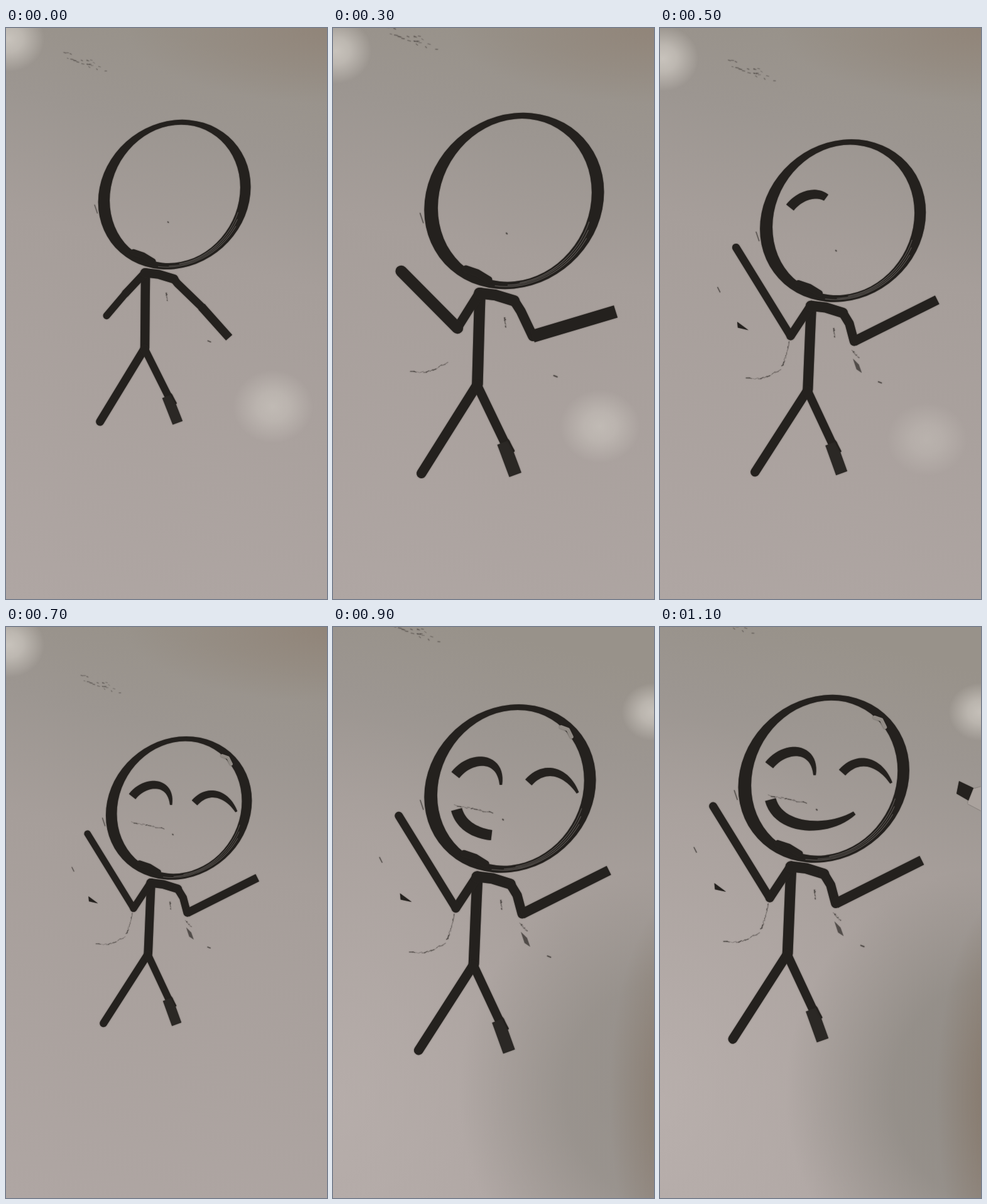
Write an HTML page with a canvas that moves like this. It is 511 by 908 pixels and loops after 1300 ms.

```html
<!DOCTYPE html>
<html lang="en">
<head>
<meta charset="utf-8">
<title>Whiteboard figure</title>
<style>
html, body { margin: 0; width: 100%; height: 100%; overflow: hidden; background: #a49d99; }
canvas { display: block; width: 100vw; height: 100vh; }
</style>
</head>
<body>
<canvas id="stage" width="511" height="908"></canvas>
<script>
const W = 511, H = 908, STEP = 100, LOOP = 1300, LAST = 11;
const ctx = document.getElementById('stage').getContext('2d');
const INK = '#24211e', SMUDGE = 'rgba(50,46,43,.6)', FAINT = 'rgba(60,55,52,.35)';

// hand-held camera: step, neck x, neck y, body scale, head scale, lean
const CAMERA = [
  [0, 222, 384, .847, .87, .028],
  [2, 222, 378, 1.03, 1.048, .028],
  [4, 246, 453, 1.018, 1.003, 0],
  [7, 231, 402, .798, .833, 0],
  [8, 234, 411, .973, .958, 0],
  [10, 226, 371, 1, 1, 0],
  [11, 209, 375, .98, .976, 0]
];

// elbow and hand for arms down, out and up, measured from the neck
const LEFT = [[-39, 45, -76, 87], [-37, 63, -117, 36], [-35, 57, -127, -92]];
const RIGHT = [[103, 70, 153, 128], [90, 80, 209, 73], [72, 66, 212, -4]];

const clamp = (v, lo, hi) => Math.max(lo, Math.min(hi, v));
const mix = (a, b, k) => a.map((v, i) => v + (b[i] - v) * k);

function cameraAt(n) {
  let i = 0;
  while (i < CAMERA.length - 2 && CAMERA[i + 1][0] <= n) i++;
  const a = CAMERA[i], b = CAMERA[i + 1];
  return mix(a, b, (n - a[0]) / (b[0] - a[0]));
}

function armAt(keys, lift) {
  const i = lift < 1 ? 0 : 1;
  return mix(keys[i], keys[i + 1], lift - i);
}

function seeded(s) {
  return () => (s = (s * 16807) % 2147483647) / 2147483647;
}

function line(p, width, color = INK, cap = 'round') {
  ctx.strokeStyle = color;
  ctx.lineWidth = width;
  ctx.lineCap = cap;
  ctx.lineJoin = 'round';
  ctx.beginPath();
  for (let i = 0; i < p.length; i += 2) ctx.lineTo(p[i], p[i + 1]);
  ctx.stroke();
}

function shape(p, color = INK) {
  ctx.fillStyle = color;
  ctx.beginPath();
  for (let i = 0; i < p.length; i += 2) ctx.lineTo(p[i], p[i + 1]);
  ctx.fill();
}

// tapering marker stroke along a cubic curve, drawn up to the share k
function brush(p, from, to, k) {
  if (k <= 0) return;
  const edge = [[], []], steps = 24;
  for (let i = 0; i <= steps; i++) {
    const t = i / steps * k, u = 1 - t;
    const pos = o => u * u * u * p[o] + 3 * u * u * t * p[o + 2] + 3 * u * t * t * p[o + 4] + t * t * t * p[o + 6];
    const dir = o => u * u * (p[o + 2] - p[o]) + 2 * u * t * (p[o + 4] - p[o + 2]) + t * t * (p[o + 6] - p[o + 4]);
    const dx = dir(0), dy = dir(1), r = (from + (to - from) * t ** 3) / 2 / Math.hypot(dx, dy);
    edge[0].push(pos(0) - dy * r, pos(1) + dx * r);
    edge[1].unshift(pos(0) + dy * r, pos(1) - dx * r);
  }
  shape(edge.flat());
}

// thin broken trail left by the eraser
function scratch(seed, x, y, dx, dy, bend) {
  const rnd = seeded(seed), steps = 12;
  for (let i = 0; i < steps; i++) {
    const at = k => [x + dx * k + rnd() * 2, y + dy * k + bend * Math.sin(k * Math.PI) + rnd() * 3];
    line([...at(i / steps), ...at((i + .9) / steps)], .6 + rnd(), rnd() < .5 ? FAINT : SMUDGE);
  }
}

function specks(seed, count, x, y, w, h) {
  const rnd = seeded(seed);
  for (let i = 0; i < count; i++) {
    const k = rnd(), px = x + k * w, py = y + k * h + rnd() * 16 - 8;
    line([px, py, px + 1 + rnd() * 4, py + rnd() * 2], .8 + rnd(), FAINT);
  }
}

function fade(x, y, rx, ry, rgb, stops) {
  ctx.save();
  ctx.translate(x, y);
  ctx.scale(rx, ry);
  const g = ctx.createRadialGradient(0, 0, 0, 0, 0, 1);
  stops.forEach(([k, a]) => g.addColorStop(k, `rgba(${rgb},${a})`));
  ctx.fillStyle = g;
  ctx.fillRect(-1, -1, 2, 2);
  ctx.restore();
}

const glow = (x, y, r, a) =>
  fade(x, y, r * 1.1, r, '208,203,196', [[0, a], [.4, a * .75], [1, 0]]);

function board(n, neckY) {
  const g = ctx.createLinearGradient(230, 0, 0, H);
  g.addColorStop(0, '#98928a');
  g.addColorStop(.16, '#9c9691');
  g.addColorStop(.36, '#a69e9a');
  g.addColorStop(1, '#afa6a3');
  ctx.fillStyle = g;
  ctx.fillRect(0, 0, W, H);
  if (n < 8) {
    fade(520, 0, 330, 120, '142,128,115', [[0, .75], [1, 0]]);
    glow(4, (neckY - 355) * .6, 52, .85);
    glow(425, neckY + 218, 58, .6 * clamp((7 - n) / 3, 0, 1));
  } else {
    const shade = .75 + (n - 8) * .08;
    fade(0, 760, 420, 620, '188,179,176', [[0, shade * .7], [1, 0]]);
    fade(540, 740, 340, 360, '145,140,134', [[0, shade], [.5, shade * .85], [1, 0]]);
    fade(560, 750, 120, 330, '132,117,103', [[0, shade], [.4, shade * .7], [1, 0]]);
    glow(510, 135, 46, .8);
  }
}

function marks(lift) {
  specks(71, 22, -140, -405, 78, 28);
  scratch(5, 37, 42, 1, 16, 0);
  line([113, 134, 118, 136], 2, SMUDGE);
  if (lift >= 1) scratch(9, -110, 127, 58, -16, 6);
  if (lift < 2) return;
  scratch(13, -50, 105, 12, -42, 4);
  scratch(17, 68, 80, 12, 13, 0);
  shape([-125, 33, -106, 47, -124, 43]);
  shape([70, 95, 80, 105, 85, 119, 76, 113], SMUDGE);
  line([-158, -25, -154, -17], 1.5, SMUDGE);
}

function body(lift) {
  // torso and legs
  line([0, 6, -2, 50, -6, 147], 17);
  line([-7, 149, -95, 286], 15);
  line([-6, 150, 38, 244], 14);
  line([33, 238, 51, 288], 20, '#2b2825', 'butt');
  line([40, 234, 49, 251], 3);

  // arms, with a bolder forearm halfway up
  const left = armAt(LEFT, lift), right = armAt(RIGHT, lift);
  const bold = Math.sin(lift * Math.PI / 2);
  line([-2, 7, left[0], left[1]], 14);
  line(left, 13 + 7 * bold, INK, bold > .9 ? 'butt' : 'round');
  line([-1, 6, 24, 9, 53, 18], 17);
  line([53, 18, 59 + 2.5 * lift, 26 + 5 * lift, right[0], right[1]], 15);
  line(right, 16 + 5 * bold, INK, 'butt');
}

function oval(x, y, rx, ry, from = 0, to = 7) {
  ctx.ellipse(x, y, rx, ry, 0, from, Math.min(to, from + Math.PI * 2));
  return ctx;
}

function head(n) {
  ctx.save();
  ctx.transform(1, -.1, 0, 1, 0, 0);
  ctx.fillStyle = INK;
  ctx.beginPath();
  oval(0, 0, 139.5, 136);
  ctx.closePath();
  ctx.moveTo(120.5, -1);
  oval(1, -1, 119.5, 126);
  ctx.fill('evenodd');

  // dry streaks along the lower right
  ctx.shadowBlur = 0;
  ctx.strokeStyle = 'rgba(150,143,138,.45)';
  ctx.lineWidth = 1.2;
  for (let r = 0; r < 3; r++) {
    ctx.beginPath();
    oval(0, 0, 124 + r * 4, 128 + r * 2, .35 + r * .1, 1.5 + r * .15).stroke();
  }
  ctx.restore();

  line([-75, 105, -57, 111, -39, 122], 10);
  line([-146, 19, -141, 34], 1.4, SMUDGE);
  line([-12, 50, -11, 51], 2.2, SMUDGE);
  if (n >= 7) {
    scratch(23, -91, 26, 62, 12, 0);
    line([83, -100, 94, -96, 100, -84], 6, '#918b85');
  }

  const eyes = (n - 4) / 1.5, smile = (n - 7) / 4;
  brush([-89, -22, -64, -54, -14, -54, -15, -6], 16, 4, clamp(eyes, 0, 1));
  brush([30, -10, 56, -39, 91, -29, 110, 7], 14, 4, clamp(eyes - 1, 0, 1));
  brush([-87, 34, -74, 84, 6, 88, 50, 56], 18, 6, smile);
}

function marker() {
  shape([493, 259, 511, 254, 511, 292, 490, 281], '#aaa29d');
  shape([476, 245, 499, 256, 491, 276, 472, 265]);
}

function render(n) {
  const [, x, y, bodyScale, headScale, lean] = cameraAt(n);
  const lift = Math.min(2, n / 2);
  ctx.setTransform(1, 0, 0, 1, 0, 0);
  ctx.shadowBlur = 0;
  board(n, y);

  // soft photographic edge on the ink
  ctx.shadowColor = 'rgba(50,45,42,.6)';
  ctx.shadowBlur = 2;
  ctx.setTransform(bodyScale, 0, lean, bodyScale, x, y);
  marks(lift);
  body(lift);
  ctx.setTransform(headScale, 0, 0, headScale, x + 53 * headScale, y - 137 * headScale);
  head(n);
  ctx.setTransform(1, 0, 0, 1, 0, 0);
  if (n === LAST) marker();
}

const start = performance.now();
let shown = -1;
function tick() {
  const t = (performance.now() - start) % LOOP;
  const n = Math.min(LAST, Math.floor(t / STEP));
  if (n !== shown) render(shown = n);
  requestAnimationFrame(tick);
}
tick();
</script>
</body>
</html>
```
